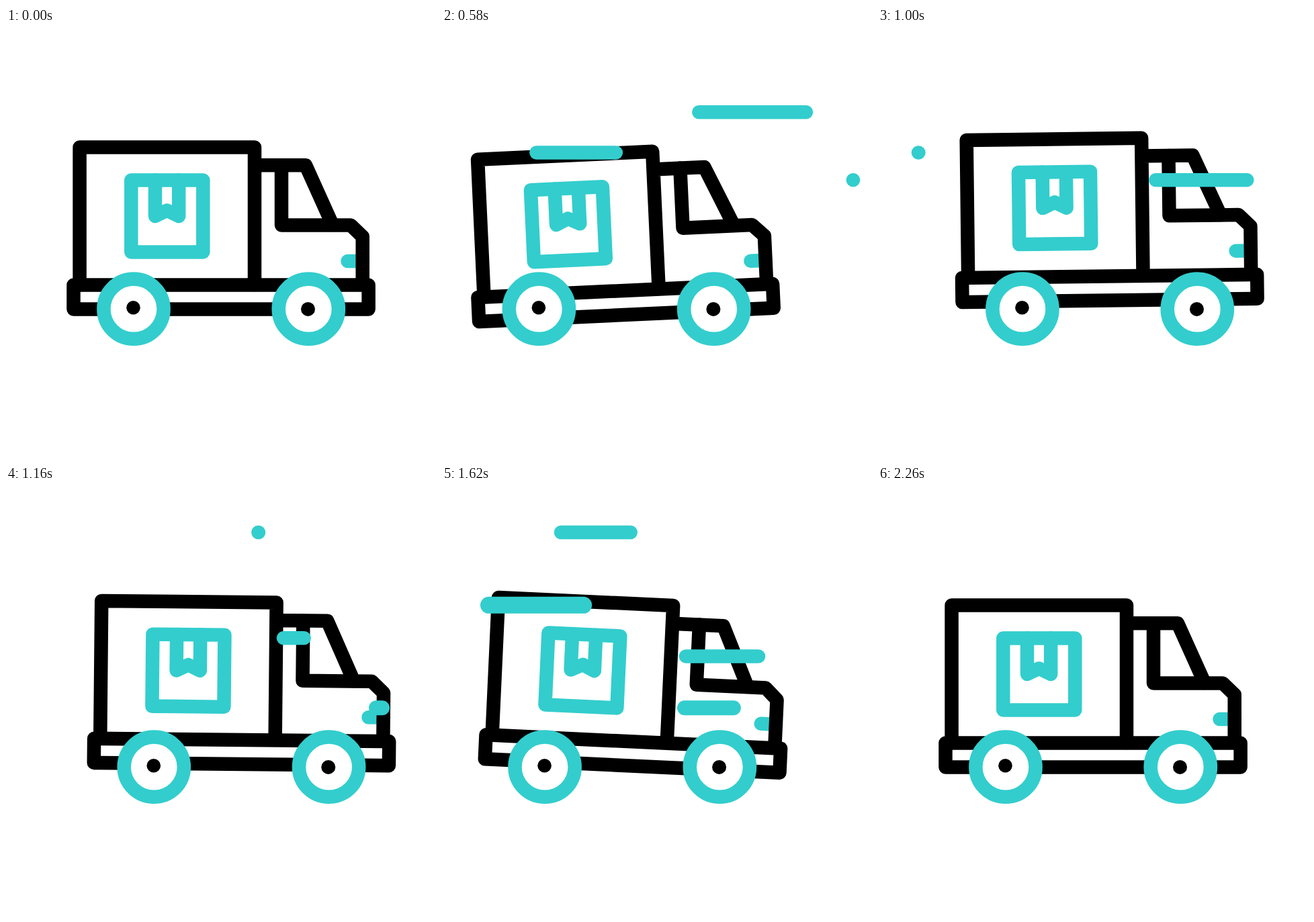
Write an HTML page that moves like this. It is 640x640 px and loops after 2.4 s.

```html
<!DOCTYPE html>
<html lang="en">
<head>
<meta charset="utf-8">
<title>Delivery truck</title>
<style>
  html, body { margin: 0; height: 100%; overflow: hidden; background: #fff; }
  svg { display: block; width: 100%; height: 100%; }
  .line { fill: none; stroke: #000; stroke-width: 20.5; stroke-linecap: round; stroke-linejoin: round; }
  .cyan { stroke: #33cdcd; }
  .wheel { fill: #fff; }
</style>
</head>
<body>
<svg viewBox="0 0 640 640">
  <g id="body" class="line">
    <path class="cyan" d="M508.5 347H531"/>
    <path d="M109.6 382V177.5H370V382M370 204.2H446L486 293"/>
    <path d="M410 204.2V293.5H513L530.7 310.5V382"/>
    <path d="M100.5 382.5H539.6V418.6H100.5Z"/>
    <path class="cyan" d="M186.3 226.5H293.3V333.6H186.3Z"/>
    <path class="cyan" d="M222 226.5V280L239.6 271.5L257.2 280V226.5"/>
  </g>
  <g id="wheels">
    <circle class="line cyan wheel" style="fill:#fff" cx="190" cy="418.2" r="44.6"/>
    <circle class="line cyan wheel" style="fill:#fff" cx="450.3" cy="418.2" r="44.6"/>
    <circle cx="189.5" cy="416.2" r="10.3"/>
    <circle cx="449.5" cy="418.4" r="10.5"/>
  </g>
  <g id="wind" class="line cyan"></g>
</svg>
<script>
const LOOP = 2400;
const get = id => document.getElementById(id);
const body = get('body'), wheels = get('wheels'), wind = get('wind');

// Keys are [time, value] pairs joined by sine easing.
const sway = [[0, 0], [556, -46], [1108, 32], [1632, -37], [2172, 0]];
const tilt = [[0, 0], [556, -2.65], [1622, 2.65], [2155, 0]];
const bounce = [[100, 0], [532, 9], [964, -13.5], [1396, 7.2], [1828, -10.2], [2260, 0]];

// Each gust is a bar whose head runs left and whose tail follows after a delay.
const TRAVEL = 199, RUN = 440;
const gusts = [
  { y: 125.3, right: 557, start: 241 },
  { y: 185.5, right: 259, start: 334, delay: 240 },
  { y: 226.3, right: 612, start: 572 },
  { y: 69, right: 376, start: 1145 },
  { y: 177.3, right: 267.5, start: 1201, width: 25 },
  { y: 330.3, right: 560, start: 1101, width: 22 },
  { y: 253.5, right: 471, start: 1389 }
];

for (const gust of gusts) {
  gust.path = document.createElementNS('http://www.w3.org/2000/svg', 'path');
  if (gust.width) gust.path.style.strokeWidth = gust.width;
  wind.append(gust.path);
}

function ease(p) {
  p = Math.min(1, Math.max(0, p));
  return (1 - Math.cos(Math.PI * p)) / 2;
}

function valueAt(keys, t) {
  let value = keys[0][1];
  for (let i = 1; i < keys.length; i++) {
    const [t0, v0] = keys[i - 1], [t1, v1] = keys[i];
    value += (v1 - v0) * ease((t - t0) / (t1 - t0));
  }
  return value;
}

function drawGust({ path, y, right, start, delay = 262 }, t) {
  const age = t - start;
  const visible = age > 0 && age < delay + RUN;
  path.style.display = visible ? '' : 'none';
  const head = right - TRAVEL * ease(age / RUN);
  const tail = right - TRAVEL * ease((age - delay) / RUN);
  path.setAttribute('d', `M${head} ${y}H${tail + 0.01}`);
}

function draw(now) {
  const t = now % LOOP;
  const x = valueAt(sway, t);
  body.setAttribute('transform',
    `translate(${x} ${valueAt(bounce, t)}) rotate(${valueAt(tilt, t)} 320 419)`);
  wheels.setAttribute('transform', `translate(${x} 0)`);
  gusts.forEach(gust => drawGust(gust, t));
}

const begin = performance.now();
function tick() {
  draw(performance.now() - begin);
  requestAnimationFrame(tick);
}
tick();
</script>
</body>
</html>
```
